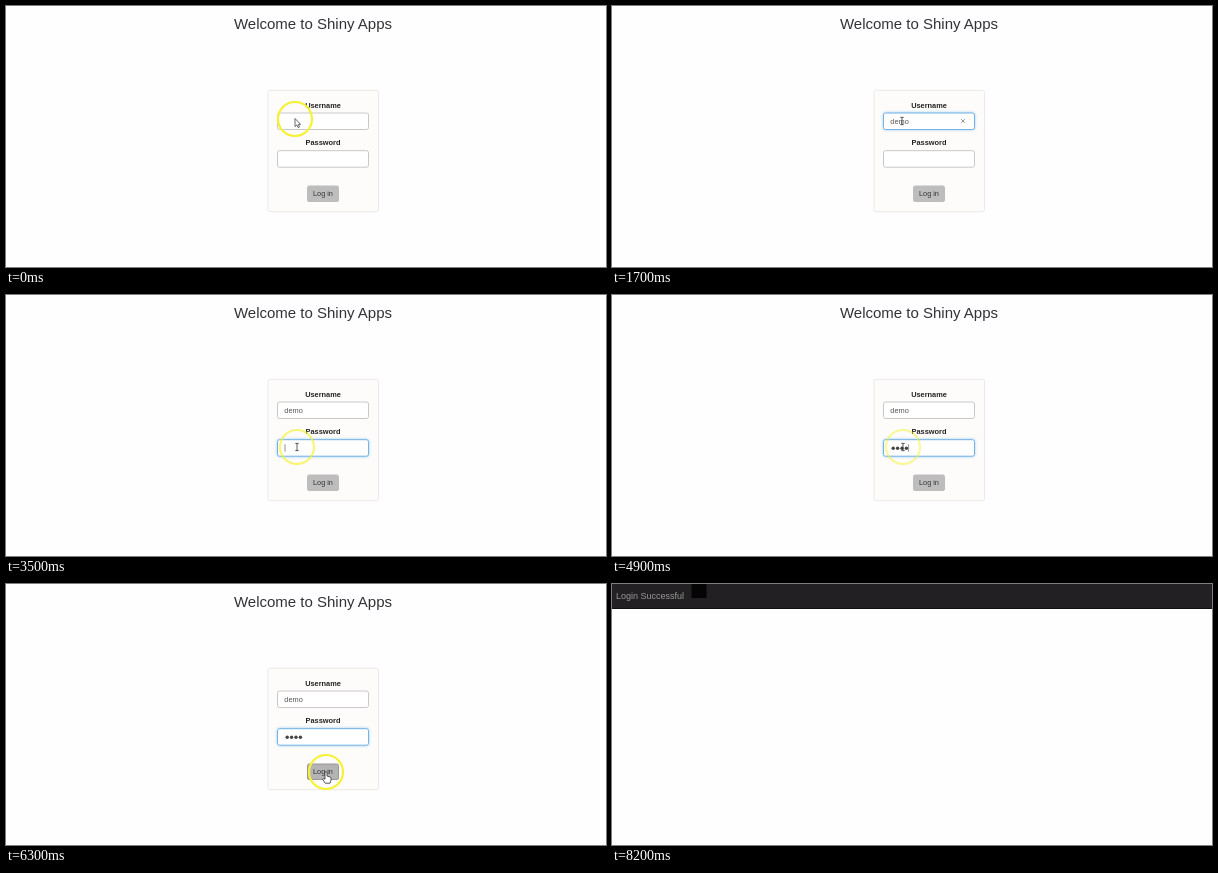
Write an HTML page that moves like this. It is 600 px wide and 261 px high and loops after 10000 ms.

```html
<!DOCTYPE html>
<html lang="en">
<head>
<meta charset="utf-8">
<title>Login</title>
<style>
  html, body { margin: 0; width: 100%; height: 100%; overflow: hidden; background: #fefdff; }
  svg { display: block; width: 100%; height: 100%; font: 7.4px "Liberation Sans", Arial, sans-serif; }
  .label { font-weight: bold; fill: #222; }
  .field { fill: #fff; stroke: #c8c8c8; }
  .field.focus { stroke: #72b2e6; filter: drop-shadow(0 0 1.5px rgba(102, 175, 233, .6)); }
  #button { fill: #bdbdbd; stroke: #bdbdbd; }
  #button.hover { fill: #b4b4b4; stroke: #989898; }
  #pointer path { stroke-width: .8; stroke-linejoin: round; }
</style>
</head>
<body>
<svg viewBox="0 0 600 261">
  <g id="login">
    <text x="307" y="23" font-size="15" text-anchor="middle" fill="#333">Welcome to Shiny Apps</text>
    <rect x="262" y="84.3" width="110.5" height="121.4" rx="2" fill="#fdfcfa" stroke="#ebe8e3" stroke-width=".9"/>
    <g class="label" text-anchor="middle">
      <text x="317" y="102">Username</text>
      <text x="317" y="139">Password</text>
    </g>
    <rect id="user" class="field" x="271.5" y="107" width="91" height="16.5" rx="2"/>
    <rect id="pass" class="field" x="271.5" y="144.7" width="91" height="16.5" rx="2"/>
    <text id="name" x="278.3" y="117.7" fill="#555"></text>
    <path id="clear" d="M349.2 113.2l3.6 3.6m0-3.6l-3.6 3.6" stroke="#777" stroke-width=".8"/>
    <g id="dots" fill="#444"></g>
    <path id="caret" d="M0-3.7v7.4" stroke="#777" stroke-width=".8"/>
    <rect id="button" x="301.5" y="180" width="31" height="15.5" rx="1.5"/>
    <text x="317" y="190.2" font-size="7.3" text-anchor="middle" fill="#333">Log in</text>
  </g>
  <g id="done">
    <path d="M0 0h600v25H0z" fill="#222022"/>
    <path d="M0 24.5h600" stroke="#111"/>
    <path d="M79.5 0h15v14h-15z" fill="#050405"/>
    <text x="4" y="15" font-size="9" fill="#999">Login Successful</text>
  </g>
  <g id="pointer">
    <circle id="ring" r="17" fill="none" stroke="#f6f233" stroke-width="2.2"/>
    <path id="arrow" d="M0-.5V7.6L1.9 5.9 3.2 8.6 4.5 8 3.3 5.4H5.6Z" fill="#fff" stroke="#444"/>
    <path id="beam" d="M-1.7-3.6h3.4M0-3.6v7.2M-1.7 3.6h3.4" fill="none" stroke="#333"/>
    <path id="hand" d="M-1 0Q0-1.2 1 0V4L4.6 5.2Q5.3 6 5 8L4 11.2H-.8L-3.5 7Q-3 5.6-1 7.2Z" fill="#fff" stroke="#333"/>
  </g>
</svg>
<script>
const LOOP = 10000, STEP = 100;
const NAME = 'demo', NAME_KEYS = [1200, 1300, 1500, 1700], PASS_KEYS = [3800, 4100, 4300, 4600];
const USER_FOCUS = 300, PASS_FOCUS = 3300, LOGGED_IN = 6500;

// [time, x, y] and [time, opacity]
const PATH = [[0, 289, 113], [100, 290, 115], [2100, 290, 115], [2700, 293, 142], [2900, 297, 150],
  [3100, 291, 152], [4900, 291, 152], [5300, 303, 169], [5800, 320, 188], [7300, 320, 188], [7400, 316, 185]];
const GLOW = [[0, 1], [200, 1], [1000, .25], [1200, 0], [2100, 0], [2200, 1], [3200, 1], [4100, 0],
  [4800, 0], [5000, 1], [7400, 1], [8200, 0]];

const $ = id => document.getElementById(id);
const show = (id, on) => $(id).style.display = on ? '' : 'none';
const typed = (keys, t) => keys.filter(k => k <= t).length;

function sample(keys, t) {
  const i = keys.findIndex(k => k[0] > t);
  if (i < 0) return keys.at(-1).slice(1);
  const a = keys[i - 1], b = keys[i], p = (t - a[0]) / (b[0] - a[0]);
  return a.slice(1).map((v, j) => v + (b[j + 1] - v) * p);
}

const dots = PASS_KEYS.map((_, i) => {
  const dot = document.createElementNS('http://www.w3.org/2000/svg', 'circle');
  dot.setAttribute('cx', 281.2 + 4.4 * i);
  dot.setAttribute('cy', 153.2);
  dot.setAttribute('r', 1.7);
  return $('dots').appendChild(dot);
});

function draw(t) {
  const inPass = t >= PASS_FOCUS, inUser = t >= USER_FOCUS && !inPass;
  const letters = typed(NAME_KEYS, t), hidden = typed(PASS_KEYS, t);
  show('login', t < LOGGED_IN);
  show('done', t >= LOGGED_IN);
  $('user').classList.toggle('focus', inUser);
  $('pass').classList.toggle('focus', inPass);
  $('name').textContent = NAME.slice(0, letters);
  show('clear', inUser && letters);
  dots.forEach((dot, i) => dot.style.display = i < hidden ? '' : 'none');

  const caretX = inPass ? 279 + 4.4 * hidden : 278.8 + (letters && $('name').getComputedTextLength());
  $('caret').setAttribute('transform', `translate(${caretX} ${inPass ? 153 : 115})`);
  show('caret', inUser && t < 1700 || inPass && t < 5100);

  const [x, y] = sample(PATH, t);
  const overButton = t < LOGGED_IN && y > 180;
  const overField = t >= STEP && (y > 107 && y < 124 || y > 145 && y < 161);
  $('pointer').setAttribute('transform', `translate(${x} ${y})`);
  $('ring').style.opacity = sample(GLOW, t)[0];
  $('button').classList.toggle('hover', overButton);
  show('pointer', t < 8200);
  show('hand', overButton);
  show('beam', overField);
  show('arrow', !overButton && !overField);
}

const start = performance.now();
function tick() {
  const t = (performance.now() - start) % LOOP;
  draw(Math.floor(t / STEP) * STEP);
  requestAnimationFrame(tick);
}
tick();
</script>
</body>
</html>
```
